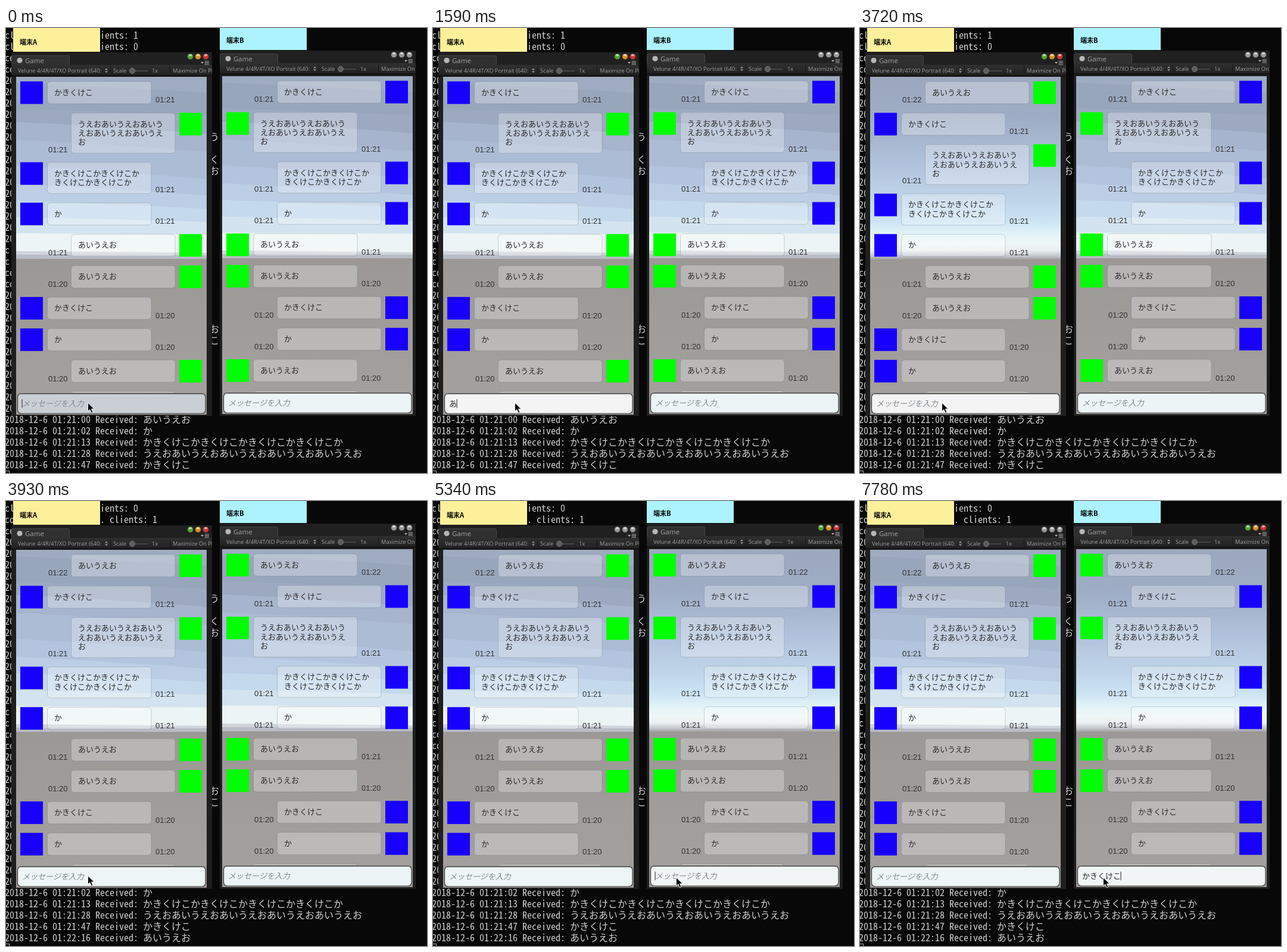
Recreate the animation shown at these times as an HTML page. Size 707 by 748 pixels, loop 8 s.

```html
<!DOCTYPE html>
<html lang="ja">
<head>
<meta charset="utf-8">
<title>Chat on two devices</title>
<style>
  html, body { margin: 0; width: 100%; height: 100%; overflow: hidden; background: #080808; }
  svg { display: block; width: 100%; height: 100%; }
  text { white-space: pre; }
  .term { font: 16px "Noto Sans Mono CJK JP", "Noto Sans Mono", monospace; fill: #d0d0d0; }
  .label { font: bold 11px "Noto Sans CJK JP", "Noto Sans CJK", sans-serif; }
  .tab { font: 11.5px "Open Sans", sans-serif; fill: #a2a2a2; }
  .tool { font: 9.3px "Open Sans", sans-serif; fill: #a0a0a0; }
  .msg { font: 13px "Noto Sans CJK JP", "Noto Sans CJK", sans-serif; fill: #2a2a2a; }
  .hint { font-style: italic; fill: #858a8e; }
  .time { font: 13px "Liberation Sans", Arial, sans-serif; fill: #333; }
</style>
</head>
<body>
<svg id="stage" viewBox="0 0 707 748" preserveAspectRatio="none"></svg>
<script>
const LOOP = 8000;
const stage = document.getElementById('stage');

const rect = (x, y, w, h, fill, more = '') =>
  `<rect x="${x}" y="${y}" width="${w}" height="${h}" fill="${fill}" ${more}/>`;
const text = (x, y, cls, str) => `<text x="${x}" y="${y}" class="${cls}">${str}</text>`;
const circle = (x, y, r, fill, more = '') => `<circle cx="${x}" cy="${y}" r="${r}" fill="${fill}" ${more}/>`;
const path = (d, fill, more = '') => `<path d="${d}" fill="${fill}" ${more}/>`;
const group = (x, y, body) => `<g transform="translate(${x} ${y})">${body}</g>`;

// Value of the last step at or before time t.
const at = (t, steps) => steps.filter(s => s[0] <= t).pop()[1];

// Messages, newest first: sender, time, lines.
const A = 'A', B = 'B', AIU = 'あいうえお', KAK = 'かきくけこ';
const history = [
  [B, '01:21', KAK],
  [A, '01:21', 'うえおあいうえおあいう', 'えおあいうえおあいうえ', 'お'],
  [B, '01:21', 'かきくけこかきくけこか', 'きくけこかきくけこか'],
  [B, '01:21', 'か'],
  [A, '01:21', AIU],
  [A, '01:20', AIU],
  [B, '01:20', KAK],
  [B, '01:20', 'か'],
  [A, '01:20', AIU],
  [A, '01:20', AIU]
];
const withNew = [[A, '01:22', AIU], ...history];

// Terminal log
const log = [];
const longRows = { 9: 'あいうえおあいう', 11: 'かきくけこかきく', 12: 'うえおあいうえお', 26: 'うえおあいうえお', 27: 'きくけこかきくこ' };
for (let r = 0; r < 34; r++) {
  const k = r % 19;
  if (r < 23 && k < 2) log.push([`close connection. clients: ${1 - k}`]);
  else if (r < 23 && k < 4) log.push([`connection to server. clients: ${k - 1}`]);
  else log.push([`2018-12-6 01:20:${10 + r} Received: `, longRows[r] || 'か']);
}
[['21:00', AIU], ['21:02', 'か'], ['21:13', KAK.repeat(4) + 'か'],
 ['21:28', 'うえお' + AIU.repeat(4)], ['21:47', KAK], ['22:16', AIU]]
  .forEach(([time, str]) => log.push([`2018-12-6 01:${time} Received: `, str]));

function terminal(first) {
  const rows = log.slice(first, first + 39).map(([en, ja], r) => {
    const y = 17.5 + r * 19;
    return text(-2, y, 'term', en) + (ja ? text(230, y, 'term', ja) : '');
  });
  return rows.join('') + rect(-2, 744.5, 7.5, 8, 'none', 'stroke="#aaa"');
}

// Sky: slanted bands [left y, drop to the right, colour] or a smooth ramp.
const bands = [
  [82, 0, '#9eabc0'], [93, 16, '#98a6bc'], [136, 12, '#9ca9c1'], [158, 20, '#a6b5cd'],
  [188, 20, '#acbcd5'], [232, 22, '#b3c4de'], [262, 20, '#bccee5'], [290, 14, '#c5d9ec'],
  [318, 8, '#d3e4f0'], [345, 2, '#ecf4f5'], [375, 3, '#d0d5dc'], [381, 1, '#b9bdc6'], [388, 0, '#9b9896']
];
const ramp = [[82, '#9ba8be'], [150, '#9eacc5'], [230, '#b1c3dc'], [290, '#c0d5ea'], [325, '#cce4f4'],
  [345, '#e0f3f8'], [362, '#f0f6f6'], [374, '#eaf0f1'], [384, '#bfc2c8'], [390, '#9b9896']];
const stops = (list, y0, y1) => list.map(([y, c]) =>
  `<stop offset="${(y - y0) / (y1 - y0)}" stop-color="${c}"/>`).join('');
const defs = `<defs>
  <linearGradient id="ramp" x2="0" y2="1">${stops(ramp, 82, 390)}</linearGradient>
  <linearGradient id="ground" x2="0" y2="1">${stops([[0, '#9b9896'], [1, '#a4a19e']], 0, 1)}</linearGradient>
  <linearGradient id="bar" x2="0" y2="1">${stops([[0, '#303030'], [1, '#222']], 0, 1)}</linearGradient>
  <clipPath id="view"><rect x="17" y="82" width="320" height="568"/></clipPath>
  <clipPath id="winA"><rect x="9" y="41" width="337" height="611"/></clipPath>
  <clipPath id="winB"><rect x="359" y="38" width="329" height="614"/></clipPath>
</defs>`;

function sky(smooth) {
  const top = smooth ? rect(17, 82, 320, 308, 'url(#ramp)') : bands.map(([y, drop, c]) =>
    path(`M17 ${y}Q170 ${y + drop * .35} 337 ${y + drop}V400H17Z`, c)).join('');
  return top + rect(17, 389, 320, 261, 'url(#ground)');
}

function messages(list, device) {
  let y = 90;
  return list.map(([who, time, ...lines]) => {
    const mine = who === device, h = 37.85 + 15.1 * (lines.length - 1);
    const x = mine ? 109 : 69;
    // Only the bubble's upper edge shows above the input bar.
    const avatar = y < 600 ? rect(mine ? 291 : 24, y - .3, 38, 38, who === A ? '#00ff00' : '#1800ff') : '';
    const row = avatar
      + rect(x + .5, y, 174.5, h - .5, '#fff', 'rx="5" fill-opacity=".28" stroke="#68717c" stroke-opacity=".3"')
      + lines.map((s, i) => text(x + 12, y + 22.7 + 15.1 * i, 'msg', s)).join('')
      + text(mine ? 71 : 251, y + h - 2.4, 'time', time);
    y += h + 15;
    return row;
  }).join('');
}

function input({ fill, value, caret }) {
  const x = 27 + 13 * value.length;
  return rect(17, 613, 320, 37, '#9d9a97')
    + rect(19.5, 614.5, 315.5, 33.5, fill, 'rx="6" stroke="#3c3c3c" stroke-width="1.2"')
    + path('M24 615.5H331', 'none', 'stroke="#777" stroke-opacity=".6"')
    + (value ? text(27, 636, 'msg', value) : text(27, 636, 'msg hint', 'メッセージを入力'))
    + (caret ? rect(x - .5, 624, 1.2, 14.5, '#444') : '');
}

function chrome() {
  return rect(9, 41, 337, 21, '#202020')
    + rect(9.5, 46.5, 97, 17, '#303030', 'rx="2" stroke="#454545"')
    + rect(9, 62, 340, 17, 'url(#bar)') + rect(9, 79, 340, 3, '#151515')
    + circle(23, 54.5, 4.6, '#b6b6b6') + text(32, 58.7, 'tab', 'Game')
    + text(20, 75, 'tool', 'Velune 4/4R/4T/XO Portrait (640:')
    + path('M166 70.5l2.5-3 2.5 3zM166 72.5l2.5 3 2.5-3z', '#999')
    + text(180, 75, 'tool', 'Scale')
    + rect(216, 71.5, 22, 1.3, '#555') + circle(212, 72, 4.5, '#5c5c5c', 'stroke="#858585" stroke-width=".8"')
    + text(245, 75, 'tool', '1x') + text(280, 75, 'tool', 'Maximize On Play')
    + path('M175.5 64V78M275.5 64V78', 'none', 'stroke="#181818"');
}

function lights(active) {
  const colours = active ? ['#55a630', '#d99020', '#d73030'] : ['#999', '#999', '#999'];
  return colours.map((c, i) => circle(309.5 + 13 * i, 48, 4.8, c, 'stroke="#444" stroke-width=".6"')
      + `<ellipse cx="${309.5 + 13 * i}" cy="45.8" rx="2.8" ry="1.7" fill="#fff" fill-opacity=".6"/>`).join('')
    + path('M327 57h5l-2.5 3zM333.5 55.5h7.5v1h-7.5zM333.5 58h7.5v1h-7.5zM333.5 60.5h7.5v1h-7.5z', '#b5b5b5');
}

function device(name, s) {
  const isA = name === A;
  const view = `<g clip-path="url(#view)">${sky(s.smooth)}${messages(s.list, name)}${input(s)}</g>`;
  return `<g clip-path="url(#win${name})">`
    + rect(isA ? 9 : 359, 38, 340, 614, '#1f1f1f')
    + (isA ? chrome() : group(350, -3, chrome()))
    + group(isA ? 0 : 342, isA ? 0 : -3, lights(s.active))
    + group(isA ? 0 : 346, isA ? 0 : -1, view) + '</g>';
}

const pointer = (x, y) => group(x, y,
  path('M0 0V14.2L3.3 11.2 5.8 17 8.3 15.9 5.9 10.3H10.5Z', '#000', 'stroke="#fff" stroke-width=".9"'));

function draw(t) {
  const a = {
    fill: at(t, [[0, '#cacfd6'], [120, '#dfe2e6'], [300, '#f4f4f4'], [3930, '#eef5f5']]),
    value: AIU.slice(0, at(t, [[0, 0], [1590, 1], [1910, 2], [2030, 3], [2180, 4], [2470, 5], [3720, 0]])),
    caret: at(t, [[0, true], [570, false], [1170, true], [3130, false]]),
    list: t < 3720 ? history : withNew,
    smooth: t >= 3720 && t < 3930,
    active: t < 4900
  };
  const b = {
    fill: t < 5340 ? '#ecf4f6' : '#f2f5f5',
    value: KAK.slice(0, at(t, [[0, 0], [6510, 2], [7180, 3], [7780, 5]])),
    caret: t >= 5340,
    list: t < 3930 ? history : withNew,
    smooth: t >= 5340,
    active: t >= 5340
  };
  const [px, py] = at(t, [[0, [137.5, 630]], [4080, [281.5, 631.5]], [4250, [317.5, 632]],
    [4400, [361, 633]], [4520, [394, 633]], [4630, [408.5, 633]]]);
  return defs + rect(0, 0, 707, 748, '#080808') + terminal(t < 3930 ? 0 : 1)
    + device(A, a) + device(B, b)
    + rect(12, 0, 146, 40, '#fdf09b') + text(23, 28, 'label', '端末A')
    + rect(359, 0, 146, 37, '#adf3ff') + text(370, 25, 'label', '端末B')
    + pointer(px, py);
}

let shown = '';
function tick() {
  const picture = draw(performance.now() % LOOP);
  if (picture !== shown) stage.innerHTML = shown = picture;
  requestAnimationFrame(tick);
}
tick();
</script>
</body>
</html>
```
